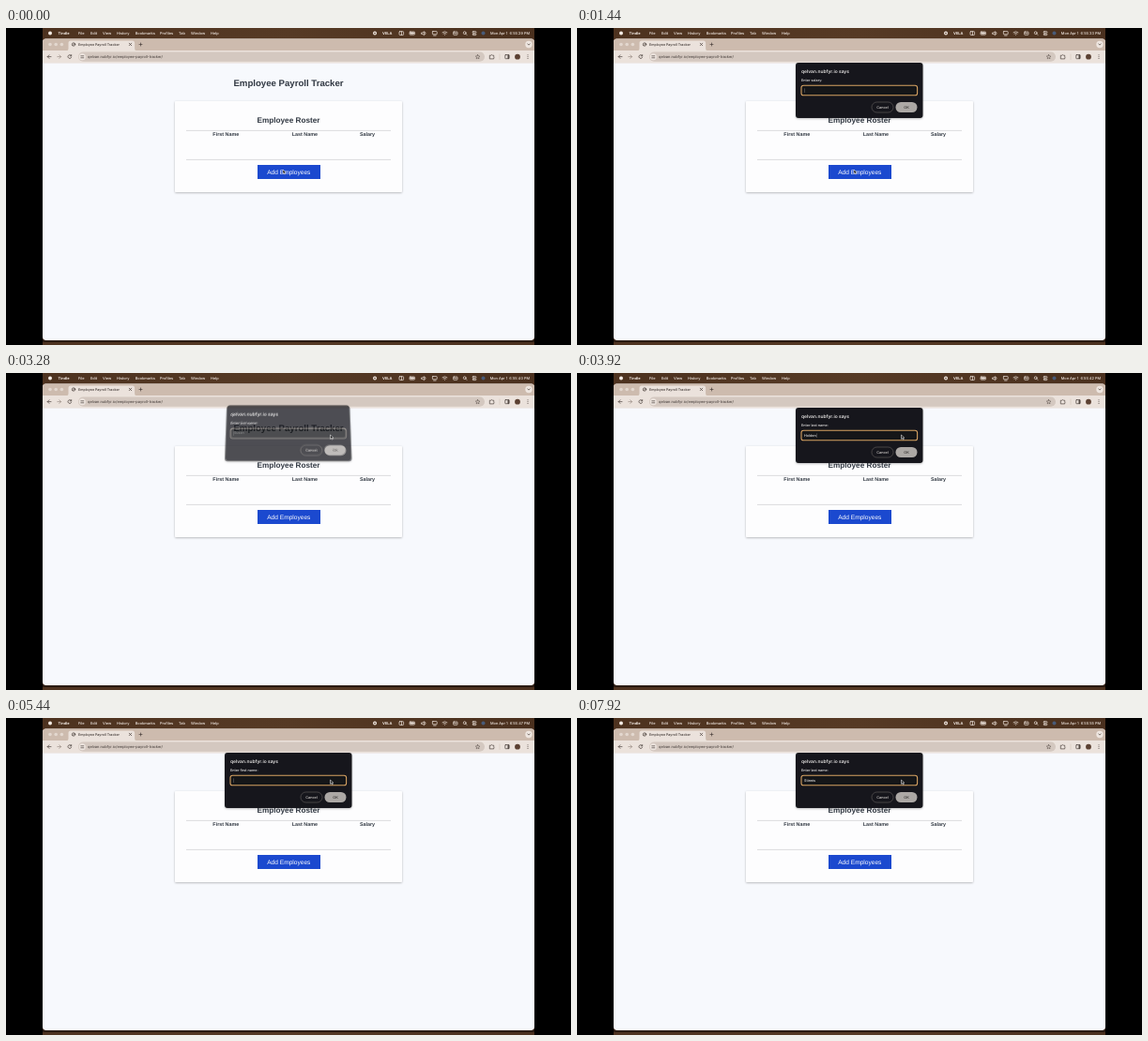
An HTML page for the animation above (8 s loop, 602 by 338 pixels).

```html
<!DOCTYPE html>
<html lang="en">
<head>
<meta charset="utf-8">
<title>Employee Payroll Tracker</title>
<style>
html, body { margin: 0; width: 100%; height: 100%; overflow: hidden; background: #000; }
svg { display: block; width: 100vw; height: 100vh; }
text { font-family: Inter, Roboto, sans-serif; text-rendering: geometricPrecision; white-space: pre; }
.page text { font-family: "Liberation Sans", Arial, sans-serif; font-weight: 700; fill: #323943; text-anchor: middle; }
.menu text { font-size: 3.9px; font-weight: 500; fill: #f4ece6; }
.bar text { font-size: 3.95px; fill: #3d3532; }
.line { fill: none; stroke-width: .7; stroke-linecap: round; stroke-linejoin: round; }
.menu .line { stroke: #efe6df; }
.bar .line { stroke: #4a403b; }
.dlg text { font-size: 3.75px; font-weight: 500; fill: #e6e4e3; }
</style>
</head>
<body>
<svg viewBox="0 0 602 338" preserveAspectRatio="none">
  <defs>
    <linearGradient id="wood" x2="1" y2="0">
      <stop offset="0" stop-color="#4d321f"/><stop offset=".5" stop-color="#563a25"/><stop offset="1" stop-color="#4a301e"/>
    </linearGradient>
    <filter id="soft" x="-10%" y="-10%" width="120%" height="125%">
      <feDropShadow dx="0" dy=".8" stdDeviation="1.3" flood-opacity=".28"/>
    </filter>
  </defs>
  <rect width="602" height="338"/>
  <rect x="39" width="524" height="338" fill="url(#wood)"/>
  <rect x="39" y="332" width="524" height="3" fill="#2a1b12"/>

  <g class="menu">
    <circle cx="47" cy="5.5" r="2" fill="#f4ece6"/>
    <g id="menu"></g>
    <circle cx="393" cy="5.6" r="2" fill="#f4ece6"/><circle cx="393" cy="5.6" r=".8" fill="#563a25"/>
    <g class="line">
      <rect x="419" y="3.7" width="4.6" height="3.8" rx=".7"/><path d="M421.5 3.7v3.8"/>
      <rect x="430" y="4" width="5.6" height="3.2" rx=".8"/><path d="M431.3 5.6h2.8" stroke-width="2"/>
      <path d="M443 5h1l1.4-1.3v4L444 6.4h-1zM446.6 4.3q1 1.3 0 2.6"/>
      <rect x="454.4" y="3.6" width="4.8" height="3.2" rx=".5"/><path d="M455.6 8h2.4"/>
      <path d="M465 4.7q2.5-2 5 0M466 6q1.5-1.2 3 0M467.4 7.2h.2"/>
      <rect x="476.6" y="4" width="4.4" height="3.3" rx=".6"/><path d="M477.5 5.6h2.5"/>
      <circle cx="488.7" cy="5.2" r="1.4"/><path d="M489.8 6.3l1.1 1.1"/>
      <rect x="497.2" y="3.7" width="3.8" height="1.5" rx=".7"/><rect x="497.2" y="6.1" width="3.8" height="1.5" rx=".7"/>
    </g>
    <circle cx="508.5" cy="5.6" r="2" fill="#485a78"/>
    <text id="clock" x="558" y="7" text-anchor="end"></text>
  </g>

  <path d="M39 15q0-3.5 3.5-3.5h517q3.5 0 3.5 3.5v314q0 4-4 4H43q-4 0-4-4z" fill="#f7f9fd"/>
  <g class="bar">
    <path d="M39 24.5v-9.5q0-3.5 3.5-3.5h517q3.5 0 3.5 3.5v9.5z" fill="#cdbbae"/>
    <rect x="39" y="24" width="524" height="13.6" fill="#ebe2dc"/>
    <path d="M64 24.2q2.5 0 2.5-2.5v-5.6q0-2.6 2.6-2.6h65.4q2.6 0 2.6 2.6v5.6q0 2.5 2.5 2.5z" fill="#ebe2dc"/>
    <g fill="#e3d8cf"><circle cx="47" cy="17.5" r="1.8"/><circle cx="53.2" cy="17.5" r="1.8"/><circle cx="59.4" cy="17.5" r="1.8"/></g>
    <circle cx="557" cy="17.5" r="3.7" fill="#eee6e0"/>
    <rect x="77" y="25.6" width="433" height="10.2" rx="5.1" fill="#d4c8c0"/>
    <circle cx="81.3" cy="30.7" r="3.5" fill="#eee6e0"/>
    <g class="line">
      <circle cx="72" cy="17.5" r="1.7"/><path d="M70.9 18.6l2.2-2.2"/>
      <path d="M131.2 16.2l2.5 2.5m0-2.5l-2.5 2.5M142 17.5h3m-1.5-1.5v3M555.8 17l1.2 1.1 1.2-1.1"/>
      <path d="M48 30.6h-3.8m1.8-1.8l-1.8 1.8 1.8 1.8"/>
      <path d="M54.8 30.6h3.8m-1.8-1.8l1.8 1.8-1.8 1.8" stroke="#9b8e86" style="stroke:#9b8e86"/>
      <path d="M69.4 29.4a1.9 1.9 0 1 0 .3 1.7M69.7 28.5v1.3h-1.4"/>
      <path d="M79.8 29.8h3M79.8 31.8h3"/>
      <path d="M502.6 28.5l.7 1.4 1.6.2-1.2 1.1.3 1.6-1.4-.8-1.4.8.3-1.6-1.2-1.1 1.6-.2z" stroke-width=".5"/>
      <path d="M515.7 29.2h1.2q.8-1.3 1.6 0h1.2v1.2q1.2.7 0 1.4v1.1h-4z"/>
      <rect x="531.8" y="28.6" width="4.4" height="4.1" rx=".5"/><path d="M535.2 29v3.4" stroke-width="1.4"/>
      <path d="M526 28v5.4" style="stroke:#cbbcb1" stroke-width=".5"/>
      <path d="M556 28.8v.01M556 30.7v.01M556 32.6v.01" stroke-width=".9"/>
    </g>
    <circle cx="545" cy="30.7" r="2.9" fill="#5b4032"/>
    <text x="77" y="19" font-weight="500" style="font-size:3.65px">Employee Payroll Tracker</text>
    <text x="87" y="32.1">qelvan.nubfyr.io/employee-payroll-tracker/</text>
  </g>

  <g class="page">
    <text x="301" y="62.3" font-size="9.65">Employee Payroll Tracker</text>
    <rect x="180" y="78" width="242" height="97" rx="1" fill="#fdfdfe" filter="url(#soft)"/>
    <text x="301" y="101" font-size="8.2">Employee Roster</text>
    <path d="M192 109.4h218M192 140.4h218" stroke="#d3d4d6" stroke-width=".8"/>
    <g font-size="5.4">
      <text x="234.3" y="115.2">First Name</text>
      <text x="318.4" y="115.2">Last Name</text>
      <text x="385" y="115.2">Salary</text>
    </g>
    <rect x="268" y="146" width="67" height="15" fill="#1b49cf"/>
    <text x="301.3" y="155.5" font-size="6.6" style="fill:#fff;font-weight:400">Add Employees</text>
  </g>

  <g id="old" class="dlg"></g>
  <g id="now" class="dlg"></g>
  <path id="mouse" d="M0 0v4.3l1-.9.8 1.6.9-.4-.8-1.5h1.4z" fill="#111" stroke="#fff" stroke-width=".55"/>
</svg>
<script>
const LOOP = 8000, STEP = 80;
const HOST = 'qelvan.nubfyr.io';
const ASK = 'Do you want to add another employee?';
const $ = id => document.getElementById(id);

// start, label, typed text, typing begins, typing ends
const scenes = [
  [0],
  [160, 'Enter first name:', 'Daniel', 320, 640],
  [720, 'Enter last name:', 'Porter', 880, 1280],
  [1360, 'Enter salary:', '4561237', 1600, 2000],
  [2160, ASK],
  [2720, 'Enter first name:', 'Susan', 2880, 3120],
  [3280, 'Enter last name:', 'Holden', 3520, 3920],
  [4080, 'Enter salary:', '7894561', 4320, 4720],
  [4960, ASK],
  [5360, 'Enter first name:', 'Grant', 5600, 5920],
  [6160, 'Enter last name:', 'Stinnis', 6320, 7600]
];

const menu = [[77, 'File'], [90, 'Edit'], [103, 'View'], [118, 'History'], [137.8, 'Bookmarks'],
  [164, 'Profiles'], [184, 'Tab'], [197, 'Window'], [218, 'Help']];
$('menu').innerHTML = '<text x="55.6" y="7" font-weight="700" style="font-weight:700">Tindle</text>' +
  '<text x="401" y="7" style="font-weight:700">VELA</text>' +
  menu.map(([x, s]) => `<text x="${x}" y="7">${s}</text>`).join('');

function typed(text, from, to, t) {
  if (t < from) return '';
  return text.slice(0, 1 + Math.floor((t - from) / (to - from) * (text.length - 1) + 1e-6));
}

function panel(bottom, inset) {
  const l = 233 + inset, r = 368.5 - inset;
  return `<path d="M${l + 3} 37H${r - 3}q3 0 3 3L368.5 ${bottom - 3}q0 3-3 3H236q-3 0-3-3L${l} 40q0-3 3-3z"
    fill="#18191b" filter="url(#soft)"/>`;
}

function button(x, y, label, attrs, color) {
  return `<rect x="${x}" y="${y}" width="23" height="11" rx="5.5" ${attrs}/>` +
    `<text x="${x + 11.5}" y="${y + 6.9}" text-anchor="middle" style="fill:${color}">${label}</text>`;
}

function dialog(scene, t, tilt) {
  const [start, label, text, from, to] = scene;
  if (!label) return '';
  const prompt = text !== undefined, y = prompt ? 79 : 63.3;
  let s = panel(prompt ? 96 : 80.5, tilt ? 2 : 0) +
    `<text x="239" y="48.2" style="font-size:4.9px;font-weight:600">${HOST} says</text>` +
    `<text x="239" y="57.1">${label}</text>`;
  if (prompt) {
    const caret = (t - start) % 300 < 170;
    s += `<rect x="239" y="61.2" width="123.6" height="10.6" rx="2.4" fill="#151618"
      stroke="${tilt ? '#77706a' : '#d6a262'}" stroke-width="1.1"/>` +
      `<text x="242" y="67.8">${typed(text, from, to, t)}<tspan dx=".2" style="font-weight:300">${caret ? '|' : ''}</tspan></text>`;
  } else {
    s += `<rect x="338.2" y="${y - 1.3}" width="25.6" height="13.6" rx="6.8" fill="none" stroke="#d6a262" stroke-width="1"/>`;
  }
  return s + button(314, y, 'Cancel', 'fill="none" stroke="#5d5a58" stroke-width=".7"', '#dad6d3') +
    button(339.5, y, 'OK', `fill="${prompt ? '#aca8a5' : '#bdb8b4'}"`, '#2b2826');
}

function pose(id, html, shift, scale, alpha) {
  const g = $(id);
  g.innerHTML = html;
  g.setAttribute('opacity', alpha);
  g.setAttribute('transform', `translate(${301 * (1 - scale)} ${shift}) scale(${scale} 1)`);
}

function draw(time) {
  const t = Math.floor(time % LOOP / STEP) * STEP;
  const i = scenes.findLastIndex(s => s[0] <= t);
  const swap = i > 0 && t - scenes[i][0] < STEP;
  pose('old', swap ? dialog(scenes[i - 1], t, true) : '', -2.8, .985, .5);
  pose('now', dialog(scenes[i], t, swap), swap ? -1.8 : 0, 1, swap ? .5 : 1);

  const k = Math.min(1, Math.max(0, (t - 2240) / 320)), e = k * k * (3 - 2 * k);
  $('mouse').setAttribute('transform', `translate(${295 + 50.5 * e} ${151 - 85 * e})`);
  $('clock').textContent = `Mon Apr 1  6:55:${Math.floor(29.1 + t / 300)} PM`;
}

const begin = performance.now();
function tick() {
  draw(performance.now() - begin);
  requestAnimationFrame(tick);
}
tick();
</script>
</body>
</html>
```
